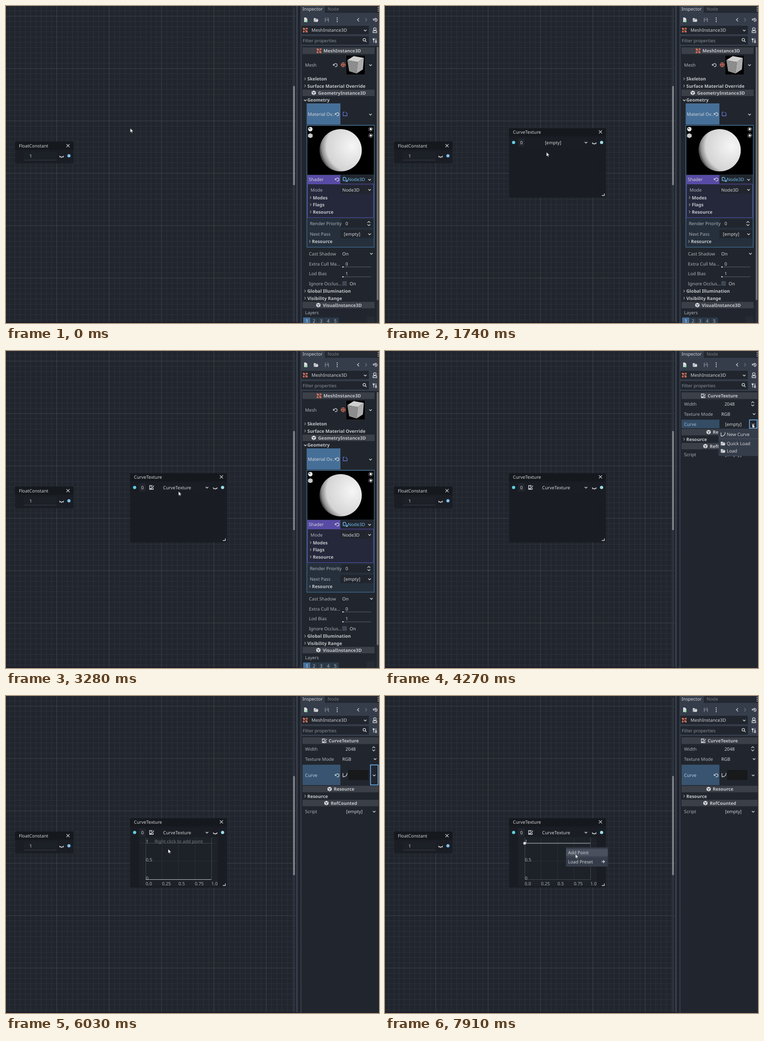
Animation, 812 px wide and 690 px high, one loop 8000 ms. Source, as an HTML page:

```html
<!DOCTYPE html>
<html lang="en">
<head>
<meta charset="utf-8">
<title>Curve texture editor</title>
<style>
html, body { margin: 0; width: 100%; height: 100%; overflow: hidden; background: #21262e; }
svg { display: block; }
#stage { width: 812px; height: 690px; }
text { font: 9.8px "Noto Sans", sans-serif; fill: #d2d4d7; transform: translateY(3.5px); text-rendering: geometricPrecision; }
.b, .b text { font-weight: 700; fill: #c3c6ca; }
.l, .l text { fill: #adb1b7; }
.mid { text-anchor: middle; }
.dim { fill: #757a82; }
.blue { fill: #70b9ee; }
.line { fill: none; stroke: #d8dadd; stroke-width: 1.3; }
.dark { fill: #21262e; }
.base { fill: #363d4a; }
.cat { fill: #3b3f48; }
.hot { fill: #4a505d; }
.focus { fill: none; stroke: #70bafa; stroke-width: 1.6; }

/* Everything shares one 8 s clock: 1% is 80 ms. */
.t { animation: 8s step-end infinite; }
.dialog { animation-name: dialog; }
.picked { animation-name: picked; }
.node { animation-name: node; }
.pickFocus { animation-name: pickFocus; }
.menuA { animation-name: menuA; }
.hotA { animation-name: hotA; }
.assigned { animation-name: assigned; }
.inspect { animation-name: inspect; }
.rowFocus { animation-name: rowFocus; }
.menuB { animation-name: menuB; }
.hotB { animation-name: hotB; }
.edited { animation-name: edited; }
.shift { animation-name: shift; }
.tallFocus { animation-name: tallFocus; }
.hint { animation-name: hint; }
.curve { animation-name: curve; }
.point { animation-name: point; }
.level { animation-name: level; }
.menuC { animation-name: menuC; }
.hotC { animation-name: hotC; }
.cursor { animation-name: cursor; }

@keyframes dialog { 0%, 20.125% { opacity: 0 } 7.4% { opacity: 1 } }
@keyframes picked { 0% { opacity: 0 } 16.875%, 100% { opacity: 1 } }
@keyframes node { 0% { opacity: 0 } 20.125%, 100% { opacity: 1 } }
@keyframes pickFocus { 0%, 39.375% { opacity: 0 } 30.875% { opacity: 1 } }
@keyframes menuA { 0%, 39.375% { opacity: 0 } 32.75% { opacity: 1 } }
@keyframes hotA { 0% { opacity: 0 } 34.3%, 100% { opacity: 1 } }
@keyframes assigned { 0% { opacity: 0 } 39.375%, 100% { opacity: 1 } }
@keyframes inspect { 0% { opacity: 0 } 41.875%, 100% { opacity: 1 } }
@keyframes rowFocus { 0%, 60.25% { opacity: 0 } 51.75% { opacity: 1 } }
@keyframes menuB { 0%, 60.25% { opacity: 0 } 52.6% { opacity: 1 } }
@keyframes hotB { 0% { opacity: 0 } 56.1%, 100% { opacity: 1 } }
@keyframes edited { 0% { opacity: 0 } 60.25%, 100% { opacity: 1 } }
@keyframes shift { 0% { transform: translateY(-26px) } 60.25%, 100% { transform: none } }
@keyframes tallFocus { 0%, 87.875% { opacity: 0 } 60.25% { opacity: 1 } }
@keyframes hint { 0% { opacity: 1 } 80.375%, 100% { opacity: 0 } }
@keyframes curve { 0% { opacity: 0 } 80.375%, 100% { opacity: 1 } }
@keyframes level {
  0%, 87.875% { transform: translateY(348.5px) }
  88.7% { transform: translateY(337px) }
  89.55% { transform: translateY(325px) }
  90.4%, 100% { transform: translateY(320.5px) }
}
@keyframes point {
  0%, 87.875% { transform: translateX(353.5px) }
  88.7% { transform: translateX(322px) }
  89.55%, 100% { transform: translateX(304px) }
}
@keyframes menuC {
  0%, 80.375% { opacity: 0; transform: translate(354px, 333.5px) }
  76% { opacity: 1; transform: translate(354px, 333.5px) }
  95.5%, 100% { opacity: 1; transform: translate(394px, 329.5px) }
}
@keyframes hotC { 0%, 80.375% { opacity: 0 } 77.7% { opacity: 1 } 98%, 100% { opacity: 1 } }
@keyframes cursor {
  0% { transform: translate(270.5px, 266px) }
  4.75% { transform: translate(270.5px, 266px); animation-timing-function: steps(2, start) }
  6.5% { transform: translate(262px, 264px); animation-timing-function: steps(6, start) }
  11.875% { transform: translate(307px, 298px); animation-timing-function: steps(3, start) }
  14.375% { transform: translate(335px, 322px) }
  20.125% { transform: translate(335px, 322px); animation-timing-function: steps(12, start) }
  31% { transform: translate(433.5px, 298px) }
  33.5% { transform: translate(433.5px, 298px); animation-timing-function: steps(3, start) }
  36% { transform: translate(385px, 315px) }
  39.375% { transform: translate(385px, 315px); animation-timing-function: steps(4, start) }
  42.75% { transform: translate(366px, 296px); animation-timing-function: steps(9, start) }
  50.125% { transform: translate(780px, 166px); animation-timing-function: steps(2, start) }
  51.75% { transform: translate(799.5px, 158.5px) }
  54.375% { transform: translate(799.5px, 158.5px); animation-timing-function: steps(5, start) }
  58.75% { transform: translate(776px, 177px) }
  62.75% { transform: translate(776px, 177px); animation-timing-function: steps(4, start) }
  66% { transform: translate(674.5px, 219px); animation-timing-function: steps(9, start) }
  73.5% { transform: translate(378px, 364px); animation-timing-function: steps(2, start) }
  75.125% { transform: translate(345px, 346px); animation-timing-function: steps(1, start) }
  76% { transform: translate(353px, 333px); animation-timing-function: steps(4, start) }
  79.375% { transform: translate(374px, 344px) }
  80.375% { transform: translate(374px, 344px); animation-timing-function: steps(5, start) }
  85.25% { transform: translate(361.5px, 352.5px); animation-timing-function: steps(2, start) }
  87% { transform: translate(353px, 347px) }
  87.875% { transform: translate(353px, 347px); animation-timing-function: steps(4, start) }
  91.25% { transform: translate(248px, 312px); animation-timing-function: steps(5, start) }
  95.5% { transform: translate(394px, 329px) }
  98% { transform: translate(394px, 329px); animation-timing-function: steps(2, start) }
  99.75%, 100% { transform: translate(414.5px, 344px) }
}
</style>
</head>
<body>
<svg id="stage" viewBox="0 0 812 690" xmlns="http://www.w3.org/2000/svg">
<defs>
  <pattern id="minor" x="-3.9" y="21.6" width="11.4" height="11.4" patternUnits="userSpaceOnUse">
    <path d="M.5 0V11.4M0 .5H11.4" stroke="#fff" stroke-opacity=".055"/>
  </pattern>
  <pattern id="major" x="-4" y="21.6" width="114" height="114" patternUnits="userSpaceOnUse">
    <path d="M.5 0V114M0 .5H114" stroke="#fff" stroke-opacity=".085"/>
  </pattern>
  <radialGradient id="ball" gradientUnits="userSpaceOnUse" cx="754" cy="305" r="74">
    <stop offset="0" stop-color="#f6f6f6"/><stop offset=".76" stop-color="#d4d4d4"/>
    <stop offset=".9" stop-color="#8c8c8c"/><stop offset="1" stop-color="#1e1e1e"/>
  </radialGradient>
  <path id="down" class="line" d="M-2.8-1.2L0 1.5 2.8-1.2"/>
  <path id="right" class="line" d="M-1.2-2.6L1.2 0-1.2 2.6" style="stroke:#a0a4aa;stroke-width:1.1"/>
  <path id="spin" class="line" d="M-3-1.7L0-4.6 3-1.7M-3 1.7L0 4.6 3 1.7"/>
  <path id="x" class="line" d="M-3.4-3.4L3.4 3.4M3.4-3.4L-3.4 3.4"/>
  <g id="eye" class="line"><path d="M-4.6-2C-3 1.6 3 1.6 4.6-2M-3.2 0L-4 1.6M0 .7V2.8M3.2 0L4 1.6"/></g>
  <g id="undo" class="line"><path d="M-2.6-1A3.4 3.4 0 1 1-1 3.2"/><path d="M-4.4-2.6V.4H-1.4" stroke-width="1.5"/></g>
  <g id="folder"><path d="M-5-4H-1L0-2.6H4V-1H-2.5L-4 4H-5Z" fill="#d8dadd"/><path d="M-2-.4H5L3.8 4H-3.5Z" fill="#d8dadd"/></g>
  <g id="tex" class="line"><path d="M2-4H-4.4V4H3.6V1M-2.6 2.4C1 2 3 0 4.8-4M-3.4 2.5H0M-1.5-1.5H1"/></g>
  <path id="arc" class="line" d="M-4.5-4V4M-4.5 4C2 4 4.5 1 4.5-4.5"/>
  <g id="box"><path d="M0-5L4.6-2.6V2.6L0 5-4.6 2.6V-2.6Z" fill="#dcdee0"/><path d="M-3-1.6L0 0 3-1.6M0 0V3.4" fill="none" stroke="#3b3f48" stroke-width="1.1"/></g>
  <g id="mesh" fill="#f0795c"><path d="M-3.5-3.5H3.5V3.5H-3.5ZM-3.5-3.5L3.5 3.5" fill="none" stroke="#f0795c" stroke-width="1.1"/><path d="M-5-5h2.8v2.8h-2.8zM2.2-5h2.8v2.8h-2.8zM-5 2.2h2.8v2.8h-2.8zM2.2 2.2h2.8v2.8h-2.8z"/></g>
  <g id="tools" class="line"><path d="M-2.6-4.5V-1.5M-4-4.5V-2L-2.6-.8-1.2-2V-4.5M-2.6-.8V4.5M2.4-4.5V0M1.2 1V4.5H3.6V1Z"/></g>
  <g id="sun" fill="#fff"><circle r="2.4"/><circle r="4.2" fill="none" stroke="#fff" stroke-width="1.5" stroke-dasharray="1.2 2.1"/></g>
</defs>

<!-- graph -->
<rect class="dark" width="812" height="690"/>
<rect width="633" height="690" fill="url(#minor)"/>
<rect width="633" height="690" fill="url(#major)"/>
<rect x="625" y="3" width="4" height="687" fill="#2d333c"/>
<rect x="625" y="174" width="4" height="216" rx="1.5" fill="#7c8188"/>
<rect x="632" width="3" height="690" fill="#3a414d"/>
<rect x="635" width="6" height="690" fill="#20242c"/>
<rect y="688.5" width="635" height="1.5" fill="#1d1626"/>

<g>
  <rect x="19.5" y="295" width="127.5" height="47.5" rx="2" fill="#1a1d24" fill-opacity=".93"/>
  <rect x="19.5" y="295" width="127.5" height="18" rx="2" fill="#15181d"/>
  <text x="28" y="304">FloatConstant</text>
  <use href="#x" x="135" y="304"/>
  <rect x="39" y="317" width="71" height="19" fill="#1c2027"/>
  <path d="M39 335.5H110" stroke="#3a3f48"/>
  <text x="51" y="326.5">1</text>
  <use href="#eye" x="121" y="328"/>
  <circle cx="137" cy="326" r="3.5" fill="#7dc0ec"/>
</g>

<!-- new node -->
<g class="t node">
  <rect x="270" y="266" width="211" height="151" rx="2" fill="#191c23" fill-opacity=".93"/>
  <rect x="270" y="266" width="211" height="18" rx="2" fill="#15181d"/>
  <text x="278.5" y="274">CurveTexture</text>
  <use href="#x" x="469" y="274"/>
  <circle cx="280" cy="297" r="3.5" fill="#62cfe2"/>
  <rect x="290" y="288" width="14" height="18" fill="#21252d"/>
  <text class="mid" x="297" y="297">0</text>
  <rect x="307" y="288" width="139" height="18" fill="#1a1e24"/>
  <text class="mid" x="366" y="297">[empty]</text>
  <g class="t assigned">
    <rect x="307" y="288" width="118" height="18" fill="#1a1e24"/>
    <use href="#tex" x="317" y="297"/>
    <text x="342" y="297">CurveTexture</text>
  </g>
  <use href="#down" x="437.500" y="297"/>
  <rect class="focus t pickFocus" x="429.300" y="288" width="16.500" height="18"/>
  <use href="#eye" x="455.500" y="299"/>
  <circle cx="471.500" cy="297" r="3.500" fill="#9adce8"/>
  <path d="M472 412.500H477.500V408" class="line"/>

  <g class="t edited">
    <rect x="290" y="307" width="171" height="107" fill="#1d2128"/>
    <path d="M339.500 308V400M375.500 308V400M411.500 308V400M304 359.500H461M290 320.500H304M447 320.500H461" stroke="#2b2f36" fill="none"/>
    <path d="M304.500 308V400M447.500 308V400M304 320.500H447M304 399.500H447" stroke="#454a52" fill="none"/>
    <g class="l">
      <text x="304.500" y="316.500">1</text><text x="304.500" y="356">0.5</text><text x="304.500" y="396">0</text>
      <text x="304" y="408">0.0</text><text x="339.500" y="408">0.25</text><text x="375.500" y="408">0.5</text>
      <text x="411" y="408">0.75</text><text x="447" y="408">1.0</text>
    </g>
    <g class="t hint">
      <path d="M304 399.500H447" stroke="#c4c6c9"/>
      <text class="dim mid" x="376" y="316">Right click to add point</text>
    </g>
    <g class="t curve"><g class="t level">
      <path d="M304 0H447" stroke="#c4c6c9"/>
      <rect class="t point" x="-2.700" y="-2.700" width="5.400" height="5.400" fill="#dfe1e3"/>
    </g></g>
  </g>
</g>

<g class="t menuA">
  <rect class="base" x="328" y="307.500" width="121.500" height="58"/>
  <rect class="hot t hotA" x="328" y="310.500" width="121.500" height="16"/>
  <path d="M330 328.500H447" stroke="#4a505c"/>
  <use href="#tex" x="338" y="318.500"/><text x="346" y="318.500">New CurveTexture</text>
  <use href="#folder" x="338" y="339"/><text x="346" y="338.500">Quick Load</text>
  <use href="#folder" x="338" y="355"/><text x="346" y="354.500">Load</text>
</g>

<!-- inspector frame -->
<rect class="base" x="641" width="171" height="87"/>
<rect class="base" x="641" width="2.500" height="690"/>
<rect x="694" width="118" height="15" fill="#242932"/>
<text x="645.500" y="6.500">Inspector</text>
<text class="dim" x="700" y="6.500">Node</text>
<g fill="#d8dadd">
  <path d="M649 25h4l3 3v7h-7z"/><path d="M654 31v5M651.500 33.500h5" stroke="#5fe08a" stroke-width="1.300"/>
  <use href="#folder" x="675" y="30.500"/>
  <path d="M694 25.500h7l2 2v7.500h-9zM696 26v3h4v-3zM696 31h5v4h-5z" fill="#6d727b" fill-rule="evenodd"/>
  <path d="M720 25h2v2h-2zM720 29h2v2h-2zM720 33h2v2h-2zM809.500 2h1.600v2h-1.600zM809.500 6h1.600v2h-1.600zM809.500 10h1.600v2h-1.600z"/>
</g>
<path class="line" d="M768.500 26.500L765 30 768.500 33.500"/>
<path class="line" d="M782 26.500L785.500 30 782 33.500" style="stroke:#6d727b"/>
<use href="#undo" x="804" y="30"/><path class="line" d="M804 28v2.500h2"/>
<rect class="dark" x="643" y="43" width="147" height="18.500" rx="1.500"/>
<use href="#mesh" x="651.500" y="52.500"/><text x="665" y="52.500">MeshInstance3D</text><use href="#down" x="782" y="53"/>
<path class="line" d="M800 50a3 2.600 0 1 1 6 0a3 2.600 0 1 1-6 0M799 54h8v4h-8z"/>
<rect class="dark" x="643" y="65.500" width="147" height="18.500" rx="1.500"/>
<text class="dim" x="646" y="75" style="fill:#8c9199">Filter properties</text>
<circle class="line" cx="780" cy="73.500" r="2.800"/><path class="line" d="M782 75.500l3 3" stroke-width="1.700"/>
<use href="#tools" x="803" y="75"/>

<!-- mesh properties -->
<g>
  <rect x="807" y="90" width="4" height="600" fill="#2d333c"/>
  <rect x="807" y="89" width="4" height="551" rx="1.500" fill="#6c7178"/>
  <path class="cat" d="M645.500 90h157v14.500h-157zM645.500 182h157v14h-157zM645.500 644h157v14h-157z"/>
  <use href="#mesh" x="681.500" y="97.500"/><use href="#box" x="670" y="189"/><use href="#box" x="680" y="651"/>
  <g class="b">
    <text x="691" y="97.500">MeshInstance3D</text><text x="679.500" y="189">GeometryInstance3D</text><text x="689.500" y="651">VisualInstance3D</text>
    <text x="656" y="158.500">Skeleton</text><text x="656" y="174">Surface Material Override</text><text x="656" y="204.500">Geometry</text>
    <text x="656" y="620.500">Global Illumination</text><text x="656" y="636">Visibility Range</text>
  </g>
  <use href="#right" x="651" y="158.500"/><use href="#right" x="651" y="174"/><use href="#down" x="651.500" y="205"/>
  <use href="#right" x="651" y="620.500"/><use href="#right" x="651" y="636"/>
  <text class="l" x="651" y="128.500">Mesh</text>
  <use href="#undo" x="717" y="128.500"/>
  <g fill="none" stroke="#f0795c" stroke-width="1.300"><circle cx="734" cy="128" r="4.400"/><path d="M729.500 128h9M734 123.500v9"/></g>
  <rect x="741" y="108" width="40" height="41" fill="#000"/>
  <path d="M743 118l14-9 22 4-13 9z" fill="#cfcfcf"/><path d="M743 118l23 4-3 25-16-5z" fill="#8d8d8d"/><path d="M766 122l13-9-2 25-14 9z" fill="#adadad"/>
  <use href="#down" x="793.500" y="128.500"/>

  <rect x="654.500" y="212" width="73.500" height="46" fill="#466f98"/>
  <text x="657" y="235.500">Material Ov..</text><use href="#undo" x="721" y="235.500"/>
  <path d="M734 231v8h8.500v-5l-3-3M734 231h3" fill="none" stroke="#6677d6" stroke-width="1.300"/>
  <use href="#down" x="793.500" y="236"/>
  <rect x="655" y="259.500" width="146.500" height="265.500" fill="#25303c" stroke="#4b82ad"/>
  <rect x="656" y="261" width="145" height="106" fill="#000"/>
  <circle cx="728.500" cy="314" r="46" fill="url(#ball)"/>
  <circle cx="662.500" cy="268" r="4.800" fill="#eee"/><circle cx="661" cy="266.500" r="1.500" fill="#555"/>
  <path d="M662.500 277l5 2.500v5.500l-5 2.500-5-2.500v-5.500z" fill="#c9c9c9"/>
  <use href="#sun" x="794" y="268"/><use href="#sun" x="794" y="282"/>

  <rect x="656" y="368" width="72" height="19" fill="#574ba5"/>
  <rect class="dark" x="728" y="368" width="73" height="19"/>
  <text x="659" y="377.500">Shader</text><use href="#undo" x="721" y="377.500"/>
  <path d="M734 373h4l2 2v2M734 373v7h2M738 378v4M741 378v4h2v-4" fill="none" stroke="#70b9ee" stroke-width="1.500"/>
  <text class="blue" x="744" y="377.500">Node3D</text><use href="#down" x="791.500" y="378"/>
  <rect x="656.500" y="387.500" width="143.500" height="73" fill="#25283b" stroke="#584da8"/>
  <path class="dark" d="M728 391h71v18h-71zM729 464h71v18.500h-71zM728 487h72v18.500h-72z"/>
  <g class="l">
    <text x="663" y="400">Mode</text><text x="661.500" y="473.500">Render Priority</text><text x="661.500" y="496">Next Pass</text>
    <text x="659.500" y="539">Cast Shadow</text><text x="659.500" y="561">Extra Cull Ma...</text><text x="659.500" y="582.500">Lod Bias</text>
    <text x="659.500" y="604">Ignore Occlus...</text><text x="651" y="667">Layers</text>
  </g>
  <g class="b">
    <text x="668" y="417">Modes</text><text x="668" y="432.500">Flags</text><text x="668" y="448">Resource</text><text x="666" y="512.500">Resource</text>
  </g>
  <use href="#right" x="663" y="417"/><use href="#right" x="663" y="432.500"/><use href="#right" x="663" y="448"/><use href="#right" x="661.500" y="512.500"/>
  <text x="732" y="400">Node3D</text><use href="#down" x="791.500" y="400"/>
  <text x="739" y="473.500">0</text><use href="#spin" x="790" y="473.500"/>
  <text x="735.500" y="496">[empty]</text><use href="#down" x="791.500" y="496.500"/>
  <text x="732" y="539">On</text><use href="#down" x="795.500" y="539"/>
  <text x="739" y="561">0</text><text x="739" y="582.500">1</text>
  <path d="M733 568h62M733 589.500h62" stroke="#4a4f58" stroke-width="1.300"/>
  <path d="M732 568h3M732 589.500h3" stroke="#eee" stroke-width="2"/>
  <rect x="732" y="599" width="10" height="10" rx="1" fill="#414752"/><text x="748" y="604">On</text>
  <path d="M647 678h15.500v12h-15.500z" fill="#46709a"/>
  <path d="M663.500 678h14.500v12h-14.500zM679 678h14.500v12h-14.500zM694.500 678h14.500v12h-14.500zM710 678h14.500v12h-14.500z" fill="#2c3b4b"/>
  <rect x="785" y="676" width="17" height="14" fill="#262b34"/>
  <g class="mid l"><text x="655" y="685" style="fill:#e4e6e8">1</text><text x="670.500" y="685">2</text><text x="686" y="685">3</text><text x="701.500" y="685">4</text><text x="717" y="685">5</text></g>
</g>

<!-- texture properties -->
<g class="t inspect">
  <rect class="dark" x="643.500" y="87" width="168.500" height="603"/>
  <rect class="cat" x="645.500" y="90" width="165.500" height="14.500"/>
  <use href="#tex" x="693" y="97.500"/><text class="b" x="702.500" y="97.500">CurveTexture</text>
  <g class="l"><text x="651" y="115">Width</text><text x="651" y="137">Texture Mode</text></g>
  <text x="739" y="115">2048</text><use href="#spin" x="800.500" y="115"/>
  <text x="732" y="137">RGB</text><use href="#down" x="803.500" y="137"/>
  <text class="l" x="651" y="159.500">Curve</text>
  <text x="740.500" y="159.500">[empty]</text><use href="#down" x="801.500" y="159.500"/>
  <g class="t rowFocus">
    <rect x="645.500" y="149.500" width="82.500" height="18.500" fill="#344d65"/>
    <text x="651" y="159.500" style="fill:#9dbdd6">Curve</text>
    <rect class="focus" x="793.500" y="150" width="16.500" height="18"/>
  </g>
  <g class="t shift">
    <path class="cat" d="M645.500 195.500h165.500v14h-165.500zM645.500 226h165.500v14h-165.500z"/>
    <use href="#box" x="704.500" y="202.500"/><use href="#box" x="697.500" y="233"/>
    <use href="#right" x="651" y="218"/><use href="#down" x="801.500" y="251.500"/>
    <g class="b"><text x="713.500" y="202.500">Resource</text><text x="656" y="218">Resource</text><text x="707" y="233">RefCounted</text></g>
    <text class="l" x="651" y="251.500">Script</text><text x="740.500" y="251.500">[empty]</text>
  </g>
  <g class="t edited">
    <rect class="dark" x="645.500" y="149" width="166" height="45.500"/>
    <rect x="645.500" y="149.500" width="82.500" height="44.500" fill="#385470"/>
    <text x="651" y="172.500" style="fill:#b4cee2">Curve</text>
    <use href="#undo" x="721" y="172.500"/><use href="#arc" x="738" y="172"/>
    <rect x="745" y="161" width="44" height="22" fill="#17191b"/>
    <use href="#down" x="801.500" y="172.500"/>
    <rect class="focus t tallFocus" x="793.500" y="150" width="16.500" height="43.500"/>
  </g>
</g>

<g class="t menuB">
  <rect class="base" x="726" y="169" width="86" height="59.500"/>
  <rect class="hot t hotB" x="726" y="173" width="86" height="16"/>
  <path d="M728 191H812" stroke="#4a505c"/>
  <use href="#arc" x="736" y="181.500"/><text x="744" y="181.500">New Curve</text>
  <use href="#folder" x="736" y="201.500"/><text x="744" y="201.500">Quick Load</text>
  <use href="#folder" x="736" y="217.500"/><text x="744" y="217.500">Load</text>
</g>

<g class="t menuC">
  <rect class="base" width="91" height="42"/>
  <rect class="hot t hotC" y="3.500" width="91" height="16"/>
  <path d="M2 21.500H89" stroke="#414855"/>
  <text x="4.500" y="11.500">Add Point</text><text x="4.500" y="31.500">Load Preset</text>
  <path class="line" d="M77.500 31H84M81 28L84 31 81 34" stroke-width="1.500"/>
</g>

<!-- create dialog -->
<g class="t dialog">
  <rect class="base" x="270" y="228" width="137.500" height="294.500"/>
  <rect x="270" y="228" width="137.500" height="21" fill="#fff"/>
  <rect x="276" y="234" width="10" height="9" fill="#c9ced6"/><rect x="277" y="236" width="4" height="6" fill="#3d4a66"/>
  <text x="289" y="238.500" style="fill:#222">Cr...</text>
  <path d="M320 238.500h7M353 235h7v7h-7zM387 235l7 7M394 235l-7 7" fill="none" stroke="#222"/>
  <rect class="dark" x="275" y="255" width="104" height="18"/>
  <rect x="278" y="257.500" width="21.500" height="13" fill="#4b6580"/>
  <rect class="focus" x="275.300" y="255" width="103.500" height="18"/>
  <g class="t picked"><rect class="base" x="274" y="254" width="106" height="20"/><rect class="dark" x="275" y="255" width="104" height="18"/></g>
  <text x="278.500" y="264">curv</text>
  <use href="#x" x="370" y="264"/><use href="#tools" x="393" y="264"/>
  <path class="dark" d="M274.500 276h128.500v142h-128.500zM274.500 444h128.500v49.500h-128.500zM347.500 499h39.500v19h-39.500z"/>
  <rect x="303" y="316" width="97" height="18" fill="#364f68"/>
  <path d="M282.500 296V306.500H287M290.500 315V324.500H303" fill="none" stroke="#a9adb3"/>
  <path d="M290.500 325V343.500H303" fill="none" stroke="#343a44"/>
  <use href="#down" x="281.500" y="288.500"/><use href="#down" x="290.500" y="307"/>
  <text x="286" y="288.500">Textures</text><text x="294.500" y="307">Functions</text>
  <text x="303" y="325">CurveTexture</text><text x="303" y="343.500">CurveXYZTexture</text>
  <text x="277.500" y="431">Description:</text>
  <text x="277.500" y="454">Perform the curve texture</text><text x="277.500" y="467">lookup.</text>
  <rect x="290" y="499" width="39" height="19" fill="#2e343f"/>
  <text class="mid dim" x="309" y="508.500">Create</text>
  <g class="t picked"><rect class="dark" x="290" y="499" width="39" height="19"/><text class="mid" x="309" y="508.500">Create</text></g>
  <text class="mid" x="367" y="508.500">Cancel</text>
</g>

<path class="t cursor" d="M0 0V9.400L2.200 7.400 3.700 10.600 5.200 9.900 3.700 6.800H6.700Z" fill="#fff" stroke="#111" stroke-width=".6"/>
</svg>
</body>
</html>
```
